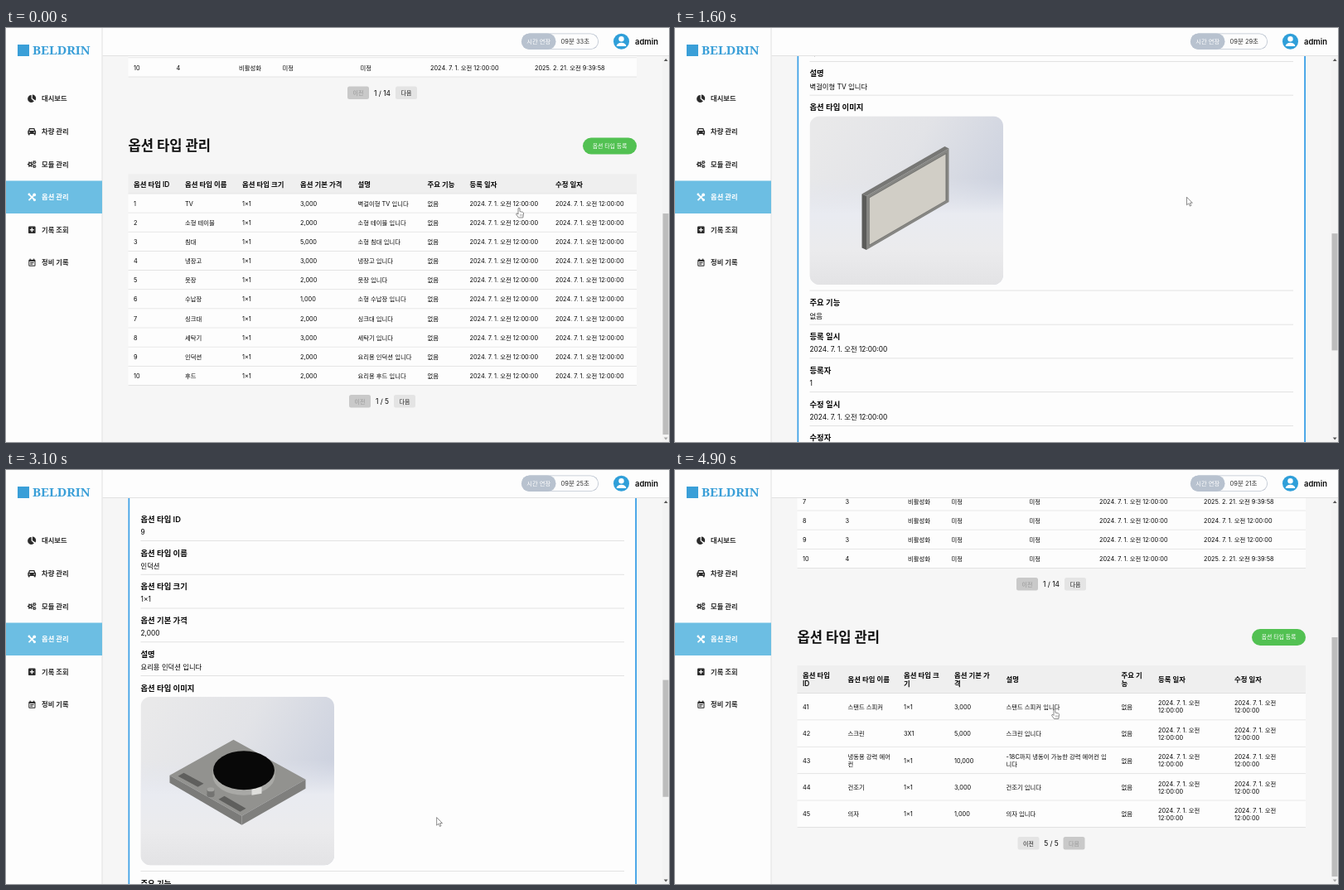
Write an HTML page with a canvas that moves like this. It is 800 by 500 pixels and loops after 5000 ms.

```html
<!DOCTYPE html>
<html lang="ko">
<head>
<meta charset="utf-8">
<title>옵션 관리</title>
<style>
html, body { margin: 0; width: 100%; height: 100%; overflow: hidden; background: #f6f6f6; }
canvas { display: block; width: 800px; height: 500px; }
</style>
</head>
<body>
<canvas id="stage" width="800" height="500"></canvas>
<script>
const ctx = document.getElementById('stage').getContext('2d');
const LOOP = 5000;
const SANS = 'Inter, "Noto Sans CJK KR", "Noto Sans CJK", sans-serif';
const INK = '#060606', BLUE = '#3a9fd8', LINE = '#dfdfdf';

// Page geometry: everything hangs off the vertical centre of the second heading.
const TOP = 34, VIEW = 466, HEAD = 424.5, ROW = 23.15, DETAIL = 697, IMAGE = 203.5;
const DATE = '2024. 7. 1. 오전 12:00:00';
const COLS1 = [154, 205.5, 281, 333.5, 427.5, 512, 638];
const COLS2 = [154, 216, 285, 355, 424.5, 508.5, 559.5, 663];
const COLS_BELOW = [154, 215, 283, 352, 424.5, 505, 556, 661.5];
const COLS_LAST = [154, 208.5, 276, 337, 399.5, 538.5, 583, 675];

const ITEMS = [
  ['TV', '3,000', '벽걸이형 TV'], ['소형 테이블', '2,000'], ['침대', '5,000', '소형 침대'],
  ['냉장고', '3,000'], ['옷장', '2,000'], ['수납장', '1,000', '소형 수납장'], ['싱크대', '2,000'],
  ['세탁기', '3,000'], ['인덕션', '2,000', '요리용 인덕션'], ['후드', '2,000', '요리용 후드']
];
const MORE = ['책상', '선반', '조명', '소파', '정수기', '온풍기', '거울', '옷걸이', '청소기', '커튼'];
const LAST = [
  ['스탠드 스피커', '3,000'], ['스크린', '5,000'],
  ['냉동용 강력 에어\n컨', '10,000', '-18C까지 냉동이 가능한 강력 에어컨 입\n니다'],
  ['건조기', '3,000'], ['의자', '1,000']
];

// Timeline
const OPEN_FIRST = 150, OPEN_NINTH = 2750, LOADS = [3550, 3830, 4090, 4340], LOAD_TIME = 110;
const SCROLL_A = [[0, 316], [250, 316], [580, 559], [1380, 559], [1850, 819], [2080, 819], [2480, 985]];
const SCROLL_B = [[2750, 288.5], [2890, 288.5], [3280, 1013]];
const POINTER = [[0, 619, 217], [250, 619, 214], [580, 617.5, 205], [1300, 617.5, 205], [2000, 617.5, 203],
  [2200, 617.5, 203], [2650, 516, 427.5], [2900, 516, 427.5], [3250, 522, 414.5], [3330, 522, 414.5],
  [3500, 485, 450], [4450, 485, 450], [4780, 458, 288.5]];

function track(keys, t, k = 1) {
  const i = keys.findIndex(key => key[0] > t);
  if (i < 0) return keys[keys.length - 1][k];
  if (i === 0) return keys[0][k];
  const a = keys[i - 1], b = keys[i], u = (t - a[0]) / (b[0] - a[0]);
  return a[k] + (b[k] - a[k]) * u * u * (3 - 2 * u);
}

function stateAt(t) {
  const s = { t, open: 0, image: false, page: 1, loading: false };
  for (const at of LOADS) {
    if (t >= at) s.page++;
    if (t >= at && t < at + LOAD_TIME) s.loading = true;
  }
  if (s.page === 1 && t >= OPEN_FIRST) {
    s.open = t < OPEN_NINTH ? 1 : 9;
    s.image = t >= (s.open === 1 ? OPEN_FIRST + 100 : OPEN_NINTH + 120);
  }
  s.height = HEAD + (s.loading ? 125 : s.page === 5 ? 298 : 357.5);
  if (s.open) s.height += DETAIL - (s.image ? 0 : IMAGE);
  const max = s.height - VIEW;
  s.scroll = s.page > 1 ? max : Math.min(max, track(t < OPEN_NINTH ? SCROLL_A : SCROLL_B, t));
  s.hand = t < 300 || (t > 2350 && t < 2950) || (t > 3200 && !s.loading);
  return s;
}

// Drawing helpers
function text(str, x, y, size, color = INK, weight = 400, align = 'left', family = SANS) {
  ctx.font = `${weight} ${size}px ${family}`;
  ctx.fillStyle = color;
  ctx.textAlign = align;
  ctx.fillText(str, x, y + size * 0.36);
}
function rect(x, y, w, h, color) {
  ctx.fillStyle = color;
  ctx.fillRect(x, y, w, h);
}
function pill(x, y, w, h, r, color) {
  ctx.beginPath();
  ctx.roundRect(x, y, w, h, r);
  ctx.fillStyle = color;
  ctx.fill();
}
function dot(x, y, r, color, ry = r) {
  ctx.beginPath();
  ctx.ellipse(x, y, r, ry, 0, 0, Math.PI * 2);
  ctx.fillStyle = color;
  ctx.fill();
}
function poly(color, ...p) {
  ctx.beginPath();
  for (let i = 0; i < p.length; i += 2) ctx.lineTo(p[i], p[i + 1]);
  ctx.closePath();
  ctx.fillStyle = color;
  ctx.fill();
}
function stroke(color, width, ...p) {
  ctx.beginPath();
  for (let i = 0; i < p.length; i += 2) ctx.lineTo(p[i], p[i + 1]);
  ctx.strokeStyle = color;
  ctx.lineWidth = width;
  ctx.stroke();
}
function rule(x, y, w) { rect(x, y, w, 0.9, LINE); }

function cells(list, xs, y, size, weight, gap) {
  list.forEach((str, i) => {
    const lines = String(str).split('\n');
    lines.forEach((line, k) => text(line, xs[i], y + (k - (lines.length - 1) / 2) * gap, size, INK, weight));
  });
}
function headRow(list, xs, y, h) {
  rect(147.5, y, 613.5, h, '#efefef');
  cells(list, xs, y + h / 2, 8.4, 600, 10.5);
  rule(147.5, y + h - 0.9, 613.5);
}
function bodyRow(list, xs, y, h) {
  rect(147.5, y, 613.5, h, '#fdfdfd');
  cells(list, xs, y + h / 2, 7.35, 400, 9);
  rule(147.5, y + h - 0.9, 613.5);
}

function pager(x, y, page, total, mid) {
  const button = (bx, label, on) => {
    pill(bx, y - 8, 26, 15.5, 2.5, on ? '#e4e4e4' : '#c9c9c9');
    text(label, bx + 13, y, 7, on ? '#222' : '#989898', 500, 'center');
  };
  button(x, '이전', page > 1);
  text(`${page} / ${total}`, x + mid, y, 8.4, INK, 400, 'center');
  button(x + 2 * mid - 26, '다음', page < total);
}

function optionTable(h) {
  headRow(['옵션 ID', '옵션 타입 ID', '상태', '마지막 정비 일자', '다음 정비 일자', '등록 일자', '수정 일자'], COLS1, h - 339, 24.5);
  for (let id = 1; id <= 10; id++) {
    const edited = id % 3 === 1 ? `2025. 2. 21. 오전 ${id < 7 ? '9:41:45' : '9:39:58'}` : DATE;
    bodyRow([id, Math.ceil(id / 3), '비활성화', '미정', '미정', DATE, edited], COLS1, h - 314.5 + (id - 1) * ROW, ROW);
  }
  pager(412, h - 64, 1, 14, 42);
}

function typeRow(id, [name, price, desc = name], date) {
  const note = desc.includes('\n') ? desc : desc + ' 입니다';
  return [id, name, id === 42 ? '3X1' : '1×1', price, note, '없음', date, date];
}

function typeTable(h, s) {
  if (s.page === 5) {
    headRow(['옵션 타입\nID', '옵션 타입 이름', '옵션 타입 크\n기', '옵션 기본 가\n격', '설명', '주요 기\n능', '등록 일자', '수정 일자'], COLS_LAST, h + 34, 34);
    LAST.forEach((item, i) =>
      bodyRow(typeRow(41 + i, item, '2024. 7. 1. 오전\n12:00:00'), COLS_LAST, h + 68 + i * 32.4, 32.4));
    pager(413.5, h + 249, 5, 5, 40.5);
    return;
  }
  headRow(['옵션 타입 ID', '옵션 타입 이름', '옵션 타입 크기', '옵션 기본 가격', '설명', '주요 기능', '등록 일자', '수정 일자'], COLS2, h + 34, 24);
  let y = h + 58, xs = COLS2;
  for (let i = 0; i < 10; i++) {
    const id = (s.page - 1) * 10 + i + 1;
    const item = s.page === 1 ? ITEMS[i] : [MORE[(i * 3 + s.page) % 10], `${1 + (i * s.page) % 4},000`];
    const row = typeRow(id, item, DATE);
    if (id === s.open) {
      detail(y, row, s.image);
      y += DETAIL - (s.image ? 0 : IMAGE);
      xs = COLS_BELOW;
    } else bodyRow(row, xs, y, ROW);
    y += ROW;
  }
  pager(414, y + 19, s.page, 5, 40);
}

function detail(y, row, image) {
  const size = DETAIL - (image ? 0 : IMAGE), r = y + 11.5;
  rect(147.5, y, 613.5, ROW + size, '#3a9fe6');
  rect(147.5, y, 613.5, ROW, '#2b98ec');
  text(row[0], 154, r, 7.6, '#fff', 700);
  rect(149.2, y + ROW + 1.5, 610, size - 3.2, '#fdfdfd');
  const field = (label, value, fy, last) => {
    text(label, 162.5, fy, 9.35, INK, 600);
    text(value, 162.5, fy + 15.5, 8.35);
    if (!last) rule(162.5, fy + 25.6, 583.5);
  };
  ['옵션 타입 ID', '옵션 타입 이름', '옵션 타입 크기', '옵션 기본 가격', '설명'].forEach((label, i) =>
    field(label, row[i], r + 41.5 + i * 40.75));
  text('옵션 타입 이미지', 162.5, r + 245.4, 9.35, INK, 600);
  if (image) picture(162.5, r + 255.8, row[0]);
  const b = r + (image ? 0 : -IMAGE);
  rule(162.5, b + 466, 583.5);
  [['주요 기능', '없음'], ['등록 일시', DATE], ['등록자', '1'], ['수정 일시', DATE], ['수정자', '1']].forEach(([label, value], i) =>
    field(label, value, b + 481.5 + i * 40.75, i === 4));
  const by = b + 684.1;
  pill(675, by - 9, 31, 18, 9, '#f9c816');
  pill(715, by - 9, 31, 18, 9, '#e2303a');
  stroke('#fff', 1.7, 688.4, by + 2.2, 692.3, by - 1.7);
  poly('#fff', 687.4, by + 3.2, 687.7, by + 1.3, 689.2, by + 2.8);
  pill(728.4, by - 1.7, 4.4, 5, 1, '#fff');
  rect(727.8, by - 3, 5.6, 0.9, '#fff');
}

function gradient(x0, y0, x1, y1, ...colors) {
  const g = ctx.createLinearGradient(x0, y0, x1, y1);
  colors.forEach((c, i) => g.addColorStop(i / (colors.length - 1), c));
  return g;
}
function picture(x, y, id) {
  ctx.save();
  ctx.translate(x, y);
  ctx.beginPath();
  ctx.roundRect(0, 0, 233.5, IMAGE, 12);
  ctx.clip();
  rect(0, 0, 234, 204, gradient(20, 0, 215, 110, '#e9e9ea', '#e2e3e7', '#cdd2df'));
  rect(0, 75, 234, 129, gradient(0, 75, 0, 204, 'rgba(226,229,238,0)', '#e9ebf1', '#ebebed', '#e3e3e5'));
  if (id === 1) {
    poly('#777775', 63, 94, 163, 36.5, 168, 39, 68.5, 96.5);
    poly('#5b5b59', 63, 94, 68.5, 96.5, 68.5, 161.5, 63, 159);
    poly('#868683', 68.5, 96.5, 168, 39, 168, 103.5, 68.5, 161.5);
    poly('#777774', 71.5, 98, 165.5, 44, 165.5, 101.5, 71.5, 156.5);
    poly('#d1cec6', 72.3, 98.8, 164, 46, 164, 101.8, 72.3, 155);
  } else {
    poly('#92928f', 35, 95, 112, 52, 199, 100, 122, 144);
    poly('#7b7b79', 35, 95, 122, 144, 122, 155, 35, 104);
    poly('#7f7f7d', 122, 144, 199, 100, 199, 111, 122, 155);
    dot(124.5, 96, 37.5, '#a9a9a6', 23);
    rect(87, 88, 75, 8, '#a9a9a6');
    poly('#dededb', 134, 112, 146, 109, 146, 117, 134, 119);
    dot(124.5, 89, 37, '#080808', 23.5);
    poly('#5f5f5d', 45, 96, 52, 92, 76, 105, 69, 109);
    poly('#5f5f5d', 94, 124, 101, 120, 127, 135, 120, 139);
    rect(80, 112, 9, 7, '#747472');
    dot(84.5, 119, 4.5, '#747472', 2.5);
    dot(84.5, 112, 4.5, '#a3a3a0', 2.6);
  }
  ctx.restore();
}

const ICONS = [
  (y, c) => {
    ctx.beginPath();
    ctx.moveTo(30.6, y);
    ctx.arc(30.6, y, 4.5, 0.75, Math.PI * 1.5);
    ctx.fillStyle = c;
    ctx.fill();
    ctx.beginPath();
    ctx.moveTo(31.8, y - 0.6);
    ctx.arc(31.8, y - 0.6, 4.4, -Math.PI / 2, 0.6);
    ctx.fill();
  },
  (y, c) => {
    poly(c, 26.5, y, 28, y - 4, 34.3, y - 4, 35.8, y);
    pill(26.3, y - 1, 9.8, 4, 1, c);
    rect(26.8, y + 2, 1.8, 2.3, c);
    rect(33.8, y + 2, 1.8, 2.3, c);
    poly('#fdfdfd', 28.3, y - 1, 29, y - 2.8, 33.4, y - 2.8, 34.1, y - 1);
    dot(28.3, y + 1, 0.7, '#fdfdfd');
    dot(34.1, y + 1, 0.7, '#fdfdfd');
  },
  (y, c) => [[29.3, 0, 2.9], [34.2, -2.4, 1.9], [34.2, 2.5, 1.9]].forEach(([x, dy, r]) => {
    for (let a = 0; a < 3; a++) {
      const u = Math.cos(a * Math.PI / 3) * r * 1.2, v = Math.sin(a * Math.PI / 3) * r * 1.2;
      stroke(c, r * 0.5, x - u, y + dy - v, x + u, y + dy + v);
    }
    dot(x, y + dy, r * 0.85, c);
    dot(x, y + dy, r * 0.38, '#fdfdfd');
  }),
  (y, c) => {
    stroke(c, 1.7, 27.5, y - 3.5, 35, y + 4);
    stroke(c, 1.7, 27.5, y + 4, 34, y - 2.5);
    dot(34.2, y - 2.7, 1.9, c);
    dot(27.9, y - 3.2, 1.4, c);
    dot(34.4, y + 3.4, 1.6, c);
  },
  (y, c) => {
    pill(27, y - 4.2, 8.6, 8.6, 1.2, c);
    rect(28.8, y - 0.6, 5, 1.3, '#fdfdfd');
    rect(30.65, y - 2.4, 1.3, 5, '#fdfdfd');
  },
  (y, c) => {
    pill(27.3, y - 3.6, 8.2, 8, 1, c);
    rect(28.3, y - 1.3, 6.2, 4.7, '#fdfdfd');
    rect(28.6, y - 4.6, 1.2, 2, c);
    rect(33, y - 4.6, 1.2, 2, c);
    rect(29.2, y - 0.3, 4.4, 1, c);
    rect(29.2, y + 1.4, 3, 1, c);
  }
];

function sidebar() {
  rect(0, 0, 116, 500, '#fdfdfd');
  rect(115.5, 0, 1, 500, '#e2e2e2');
  rect(14, 20, 14, 14, BLUE);
  text('BELDRIN', 32, 26.5, 15, BLUE, 700, 'left', '"Noto Serif", serif');
  rect(0, 184.5, 116, 39.5, '#6cbee3');
  ['대시보드', '차량 관리', '모듈 관리', '옵션 관리', '기록 조회', '정비 기록'].forEach((label, i) => {
    const y = 85.5 + i * 39.55, color = i === 3 ? '#fff' : '#2b2b2b';
    ICONS[i](y, color);
    text(label, 43, y, 8.3, color, 600);
  });
}

function topBar(t) {
  rect(116.5, 0, 683.5, 33, '#fdfdfd');
  rect(116.5, 33, 683.5, 1, '#e2e2e2');
  pill(622, 6.5, 93, 19.5, 9.75, '#bcc4d0');
  pill(622.8, 7.3, 91.4, 17.9, 9, '#fdfdfd');
  pill(622, 6.5, 41.5, 19.5, 9.75, '#b8c2cf');
  text('시간 연장', 642.7, 16.3, 7.3, '#fff', 400, 'center');
  text(`09분 ${Math.floor(33.5 - t / 400)}초`, 669.5, 16.3, 7.5, '#333');
  dot(742.5, 16.2, 9.5, '#2f9fd9');
  dot(742.5, 13.2, 3.2, '#fff');
  ctx.beginPath();
  ctx.ellipse(742.5, 22, 5.8, 4.2, 0, Math.PI, 0);
  ctx.fill();
  text('admin', 759, 16.3, 9.4, INK, 600);
}

function scrollbar(s) {
  rect(792, TOP, 8, VIEW, '#f3f3f3');
  const k = 448 / s.height;
  rect(792.5, 43 + s.scroll * k, 7, VIEW * k, '#bdbdbd');
  poly('#555', 793.8, 40, 796.2, 37, 798.6, 40);
  poly(s.scroll >= s.height - VIEW - 1 ? '#a5a5a5' : '#555', 793.8, 494.5, 796.2, 497.5, 798.6, 494.5);
}

const ARROW = new Path2D('M0 0V9.6L2.3 7.6L3.8 10.9L5.3 10.2L3.9 7H6.8Z');
const HAND = new Path2D('M-1 1Q0 -.6 1 1V4.6L4.6 5.4Q5.6 5.8 5.5 7L4.8 12H-.6L-3.4 8Q-3.4 6.6 -2 7L-1 8Z');
function pointer(s) {
  ctx.save();
  ctx.translate(track(POINTER, s.t, 1), track(POINTER, s.t, 2));
  const shape = s.hand ? HAND : ARROW;
  ctx.fillStyle = '#fff';
  ctx.fill(shape);
  ctx.strokeStyle = '#666';
  ctx.lineWidth = 0.75;
  ctx.stroke(shape);
  if (s.hand) for (const x of [1.4, 2.8, 4.1]) stroke('#888', 0.5, x, 7.6, x, 10.4);
  ctx.restore();
}

function draw(t) {
  const s = stateAt(t), h = HEAD - s.scroll + TOP;
  rect(0, 0, 800, 500, '#f6f6f6');
  optionTable(h);
  text('옵션 타입 관리', 147.5, h, 16.6, '#111', 700);
  pill(696, h - 10, 65, 20, 10, '#52c152');
  text('옵션 타입 등록', 728.5, h, 6.9, '#fff', 500, 'center');
  if (s.loading) [440, 454, 468].forEach(x => dot(x, h + 36.5, 2.9, '#62bbe0'));
  else typeTable(h, s);
  topBar(t);
  sidebar();
  scrollbar(s);
  pointer(s);
}

const start = performance.now();
function frame() {
  draw((performance.now() - start) % LOOP);
  requestAnimationFrame(frame);
}
frame();
</script>
</body>
</html>
```
